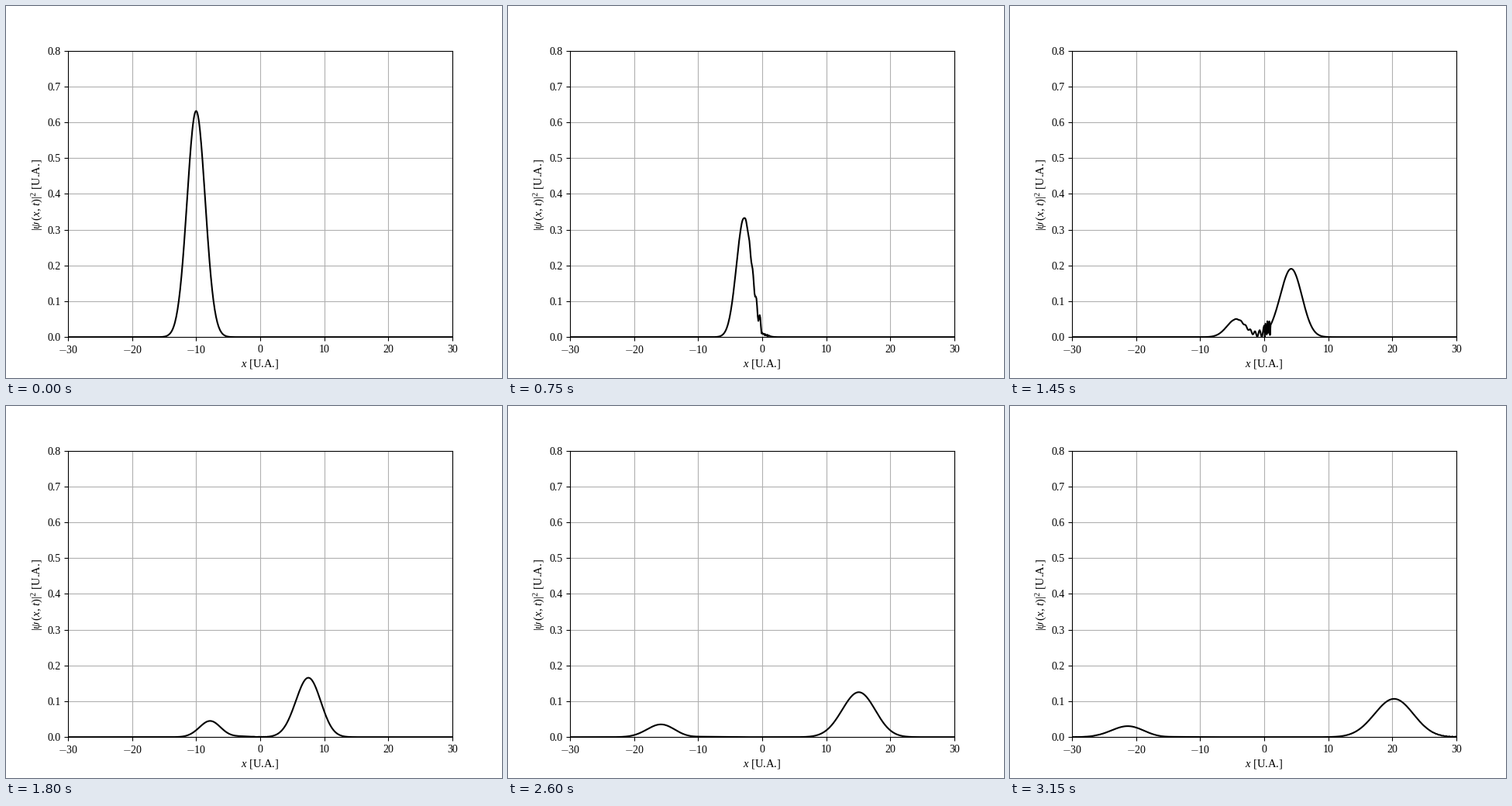
A matplotlib script that plays this animation: 640x480 px, repeating every 3.2 s.

```python
import numpy as np
import matplotlib.pyplot as plt
from matplotlib.animation import FuncAnimation

plt.rcParams.update({
    "font.family": "Liberation Serif",
    "font.size": 10,
    "mathtext.fontset": "custom",
    "mathtext.rm": "Liberation Serif",
    "mathtext.it": "Liberation Serif:italic",
    "mathtext.fallback": "cm",
})

FRAMES, INTERVAL = 64, 50
W, H, DPI = 640, 480, 100

# Wave packet meeting a square well, in atomic units
DX, DT = 0.1, 0.1
X0, K0, SIGMA = -10, 5, 1
DEPTH = 50

x = np.arange(-300, 301) * DX
site = np.arange(-300, 301)
well = np.where((site >= 0) & (site <= 10), -DEPTH, 0.0)

hop = np.full(x.size - 1, -0.5 / DX**2)
hamiltonian = np.diag(1 / DX**2 + well) + np.diag(hop, 1) + np.diag(hop, -1)
energy, modes = np.linalg.eigh(hamiltonian)

envelope = (2 * np.pi * SIGMA**2) ** -0.25 * np.exp(-(x - X0) ** 2 / (4 * SIGMA**2))
coeffs = modes.T @ (envelope * np.exp(1j * K0 * x))


def curve(n):
    # The opening pose shows the plain envelope, then the density follows
    if n == 0:
        return envelope
    psi = modes @ (coeffs * np.exp(-1j * energy * n * DT))
    return np.abs(psi) ** 2


def tick_text(v):
    return f"$-${-v}" if v < 0 else str(v)


fig, ax = plt.subplots(figsize=(W / DPI, H / DPI), dpi=DPI)
ax.set_xlim(-30, 30)
ax.set_ylim(0, 0.8)
ax.grid(True)

xticks = range(-30, 31, 10)
ax.set_xticks(list(xticks), labels=[tick_text(v) for v in xticks],
              math_fontfamily="cm")
yticks = np.arange(9) / 10
ax.set_yticks(yticks, labels=[f"{v:.1f}" for v in yticks])

fig.text(328 / W, 1 - 465 / H, "$x$ [U.A.]", size=10.5,
         ha="center", va="baseline")
fig.text(44.5 / W, 1 - 243.5 / H, r"$|\psi\,(x,\,t)|^2$ [U.A.]", size=10.5,
         ha="center", va="baseline", rotation=90, rotation_mode="anchor")

line, = ax.plot(x, curve(0), color="black", lw=1.5)


def update(n):
    line.set_ydata(curve(n))
    return line,


anim = FuncAnimation(fig, update, frames=FRAMES, interval=INTERVAL,
                     repeat=True, repeat_delay=0)
plt.show()
```
